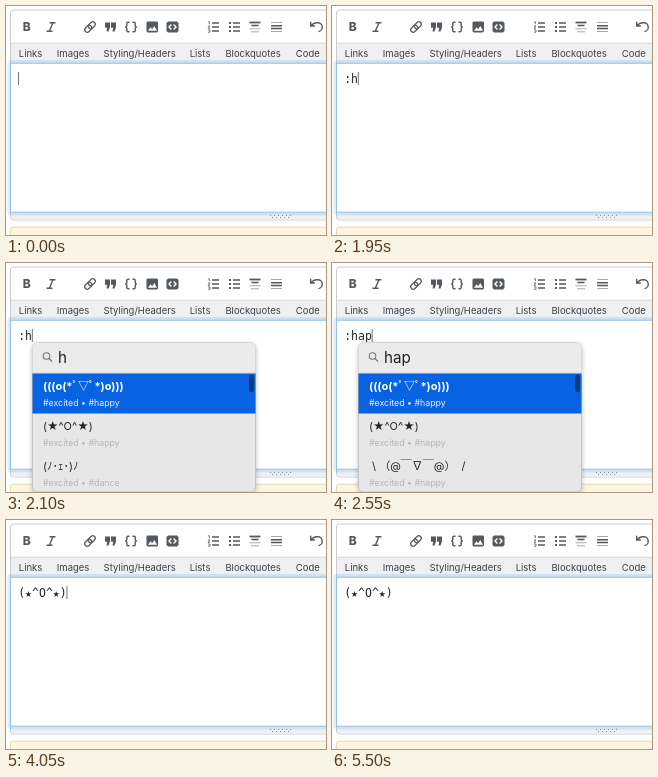
An HTML page that plays this animation: 320x229 px, repeating every 5.58 s.

```html
<!DOCTYPE html>
<html lang="en">
<head>
<meta charset="utf-8">
<title>Emoticon picker</title>
<style>
  html, body { margin: 0; height: 100%; overflow: hidden; background: #fff; }
  svg { display: block; width: 100vw; height: 100vh; }
  text { white-space: pre; font-family: Inter, "Noto Sans CJK JP", "Noto Sans CJK", "DejaVu Sans", sans-serif; }
  .tabs { font-size: 9.5px; fill: #3b4045; }
  .icons { fill: none; stroke: #53595f; stroke-width: 1.4; }
  .icons .solid { fill: #53595f; stroke: none; }
  #typed { font: 11.5px "DejaVu Sans Mono", monospace; fill: #242729; }
  #query { font-size: 15.2px; fill: #222; }
  .face { font-size: 11px; fill: #252525; }
  .tags { font-size: 8.8px; fill: #b5b5b5; }
  .on .face { fill: #fff; font-weight: 700; }
  .on .tags { fill: #e9f1ff; }
  .row rect { fill: none; }
  .on rect { fill: #0763e1; }
</style>
</head>
<body>
<svg viewBox="0 0 320 229" preserveAspectRatio="none">
  <defs>
    <filter id="shadow" x="-15%" y="-15%" width="130%" height="130%">
      <feDropShadow dx="0" dy="2" stdDeviation="2.5" flood-opacity=".24"/>
    </filter>
    <clipPath id="panel"><rect x="26.5" y="79.5" width="223" height="149.5" rx="5"/></clipPath>
  </defs>

  <!-- editor frame -->
  <rect x="4.5" y="4" width="340" height="210" rx="3" fill="#fff" stroke="#c8ccd0"/>
  <rect x="5" y="37" width="330" height="20" fill="#eff0f1"/>
  <path d="M5 37.2H320" stroke="#d6d9dc"/>
  <path d="M5 207H320V213.5H8Q5 213.5 5 210Z" fill="#eff0f1"/>
  <rect x="4.5" y="57.2" width="340" height="149" fill="#fff"/>
  <rect x="3" y="55.7" width="340" height="152" rx="2" fill="none" stroke="#0077dd" stroke-opacity=".12" stroke-width="3.4"/>
  <rect x="4.5" y="57.2" width="340" height="149" fill="none" stroke="#92bfe9"/>
  <path d="M264 209.5H285M266 211.5H283" stroke="#8b9095" stroke-dasharray="1 3"/>
  <rect x="4.5" y="221.2" width="340" height="30" rx="2" fill="#fdf5df" stroke="#e8d9ac"/>

  <g class="icons">
    <text class="solid" x="16.8" y="25.3" font-size="12" font-weight="800">B</text>
    <path d="M43.5 16.7H49.5M40.5 25.3H46.5M47 16.7L43.3 25.3"/>
    <g transform="rotate(-45 84 21)" stroke-width="1.2">
      <rect x="77.6" y="18.5" width="7.8" height="5" rx="2.5"/>
      <rect x="82.6" y="18.5" width="7.8" height="5" rx="2.5"/>
    </g>
    <path class="solid" d="M99 16.5H104V21.5L102.5 25.5H100.5L101.2 21.8H99ZM105 16.5H110V21.5L108.5 25.5H106.5L107.2 21.8H105Z"/>
    <path d="M123.5 16.2H122Q120.8 16.2 120.8 17.6V19.5Q120.8 21 119.2 21Q120.8 21 120.8 22.5V24.4Q120.8 25.8 122 25.8H123.5M126.5 16.2H128Q129.2 16.2 129.2 17.6V19.5Q129.2 21 130.8 21Q129.2 21 129.2 22.5V24.4Q129.2 25.8 128 25.8H126.5"/>
    <rect class="solid" x="140.5" y="15.5" width="11.5" height="11" rx="1.4"/>
    <path d="M142 24.7L144.5 21.3L146.2 23.3L148.3 20L151 24.7Z" style="fill:#fff;stroke:none"/>
    <path class="solid" d="M162 15.5H171L172.5 17V25L171 26.5H162L160.5 25V17Z"/>
    <path d="M165.4 18.6L163 21L165.4 23.4M167.6 18.6L170 21L167.6 23.4" style="stroke:#fff"/>
    <path d="M206 17H213M206 21H213M206 25H213M227 17H234M227 21H234M227 25H234"/>
    <path d="M202 15.8H203.4V18.2M202 20H204L202 22.3H204M202 24H204V26.2H202" stroke-width=".8"/>
    <path d="M223 17H225M223 21H225M223 25H225" stroke-width="1.8"/>
    <path d="M243.5 16.5H254.5" stroke-width="1.8"/>
    <path d="M245.5 19.5H252.5" stroke-width="1.6"/>
    <path d="M243.5 22.8H254.5M245 25.8H253" stroke="#a5a9ad" stroke-width="1"/>
    <path d="M265 16.5H276M265 25.5H276" stroke="#a5a9ad" stroke-width="1"/>
    <path d="M265 19.7H276M265 22.5H276" stroke-width="1.5"/>
    <path d="M304.7 15.8V20H308.9M305 19.7Q308 16.3 311.2 16.8A4.4 4.4 0 0 1 312.4 25.6"/>
  </g>

  <g class="tabs">
    <text x="12.8" y="50.7">Links</text>
    <text x="50.8" y="50.7">Images</text>
    <text x="97.6" y="50.7">Styling/Headers</text>
    <text x="183.7" y="50.7">Lists</text>
    <text x="219.4" y="50.7">Blockquotes</text>
    <text x="289.8" y="50.7">Code</text>
  </g>

  <text id="typed" x="12.2" y="76.6"></text>
  <rect id="caret" y="66" width="1" height="13" fill="#777"/>

  <g id="popup">
    <rect x="26.5" y="79.5" width="223" height="149.5" rx="5" fill="#e7e7e7" stroke="#c4c4c4" filter="url(#shadow)"/>
    <g clip-path="url(#panel)">
      <rect x="26" y="79" width="224" height="31" fill="#ebebeb"/>
      <path d="M26 110H250" stroke="#d6d6d6"/>
      <g fill="none" stroke="#777" stroke-width="1.1">
        <circle cx="40.5" cy="93" r="3.3"/><path d="M43 95.5L46 98.5"/>
      </g>
      <text id="query" x="52" y="100.2"></text>
      <g id="rows"></g>
      <rect id="thumb" x="243" y="111.5" width="5" height="17.5" rx="2.5" fill="#113a78"/>
    </g>
  </g>
</svg>
<script>
const LOOP = 5580, CHAR = 6.92;
const $ = id => document.getElementById(id);
const between = (t, a, b) => t >= a && t < b;
const ramp = (t, a, b) => Math.min(1, Math.max(0, (t - a) / (b - a)));

const star = ["(★^O^★)", "#excited • #happy"];
const wave = ["(((o(*ﾟ▽ﾟ*)o)))", "#excited • #happy"];
const dance = ["(ﾉ･ｪ･)ﾉ", "#excited • #dance"];
const cheer = [" \\ （@￣∇￣@）  /", "#excited • #happy"];

// Start time and editor contents
const typing = [[0, ""], [1300, ":"], [1700, ":h"], [2300, ":ha"], [2550, ":hap"], [4000, star[0]]];
// Intervals in which the caret is hidden
const blinks = [[1050, 1300], [3050, 3550], [4500, 5000], [5500, LOOP]];

$("rows").innerHTML = [0, 1, 2].map(i => `<g class="row" transform="translate(0 ${110.5 + 40 * i})">
  <rect x="26" y="0" width="224" height="40"/>
  <text class="face" x="37" y="16.7"></text><text class="tags" x="37" y="32"></text></g>`).join("");
const rows = [...$("rows").children];

function setText(el, s) {
  if (el.textContent !== s) el.textContent = s;
}

function draw(now) {
  const t = now % LOOP;
  const text = typing.filter(([at]) => t >= at).pop()[1];
  setText($("typed"), text);
  $("caret").setAttribute("x", 12 + CHAR * text.length);
  $("caret").style.opacity = blinks.some(([a, b]) => between(t, a, b)) ? 0 : 1;

  // The panel opens on the last choice, then resets to the first row
  $("popup").style.opacity = between(t, 2000, 3950) ? 1 : 0;
  setText($("query"), t < 2300 ? "h" : t < 2550 ? "ha" : "hap");
  const selected = between(t, 2050, 3250) ? 0 : 1;
  [wave, star, t < 2300 ? dance : cheer].forEach(([face, tags], i) => {
    rows[i].classList.toggle("on", i === selected);
    setText(rows[i].children[1], face);
    setText(rows[i].children[2], tags);
  });
  $("thumb").style.opacity = t < 2050 ? 0 : 1 - ramp(t, 2950, 3200);
}

const start = performance.now();
function tick() {
  draw(performance.now() - start);
  requestAnimationFrame(tick);
}
tick();
</script>
</body>
</html>
```
